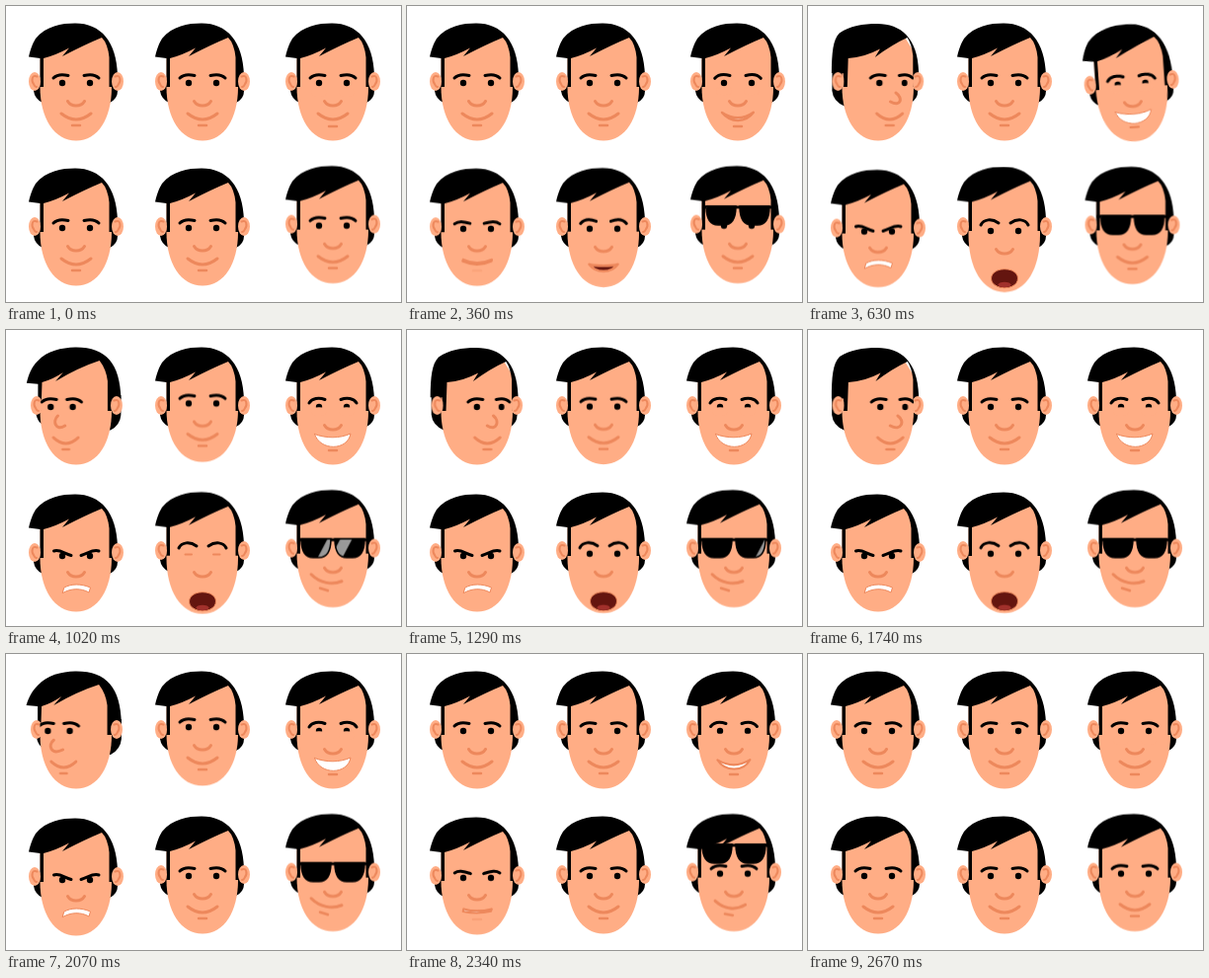
An HTML page without scripts for the animation above (2.7 s loop, 400 by 300 pixels).

```html
<!DOCTYPE html>
<html lang="en">
<head>
<meta charset="utf-8">
<title>Six moods</title>
<style>
html, body { margin: 0; width: 100%; height: 100%; overflow: hidden; background: #fff; }
svg { display: block; width: 100vw; height: 100vh; --skin: #ffad85; --line: #ed885c; }
svg * { animation: 2.7s ease-in-out infinite; }

/* Shared parts, drawn for a head centred on x = 71 */
.back {
  --a: path("M29,74 L28,86 Q29,94 37,98 L105,98 Q113,94 113,86 L113,68 Z");
  --r: path("M24,66 L24,86 Q25,97 37,102 L104,98 Q111,94 111,86 L111,66 Z");
  --l: path("M31,74 L31,84 Q32,92 38,96 L106,102 Q116,97 117,86 L117,66 Z");
}
.hair {
  --a: path("M23,51.5 C25,43 27,38 30,33 C41,20 56,17.5 70,17.5 C96,17.5 112,36 113,70 L107,82 L104.5,82 L104.5,52 Q103,38 97,32 Q80,39 57,51 L64,42.5 Q50,50 38,53 L38,82 L34.5,82 L34.5,53 Z");
  --r: path("M24,70 C24,48 25,34 32,27 C42,20 56,18 70,18 C94,18 111,32 112,66 L109,82 L106.5,82 L106.5,50 Q105,38 101,32 Q86,39 69,52 L74,43.5 Q58,52 41,53 L40,82 L36,82 L36,70 Z");
  --l: path("M20.5,52 C23,44 26,38 32,32 C42,21 56,18 70,17.5 C102,17 116,34 117,70 L108,82 L102.5,82 L102.5,52 Q101,40 94,31 Q72,38 48,52 L56,43 Q46,50 36,53 L35,82 L32,82 L32,53 Z");
}
.nose {
  --a: path("M62.5,96.5 C66,102.5 76,102.5 79.5,96.5");
  --r: path("M92,87 C100,92 96,103 84,97");
  --l: path("M48,87 C41,92 45,103 57,97");
}
.brow-l { --a: path("M48,73 C52,69 57,69 63,70.5"); }
.brow-r { --a: path("M79,70.5 C85,69 90,69 94,73"); }
.mouth { --a: path("M56,109 C66,117 76,117 86,109 C76,117 66,117 56,109 Z"); }
.chin { --a: path("M67,121 L75,121"); }
.back, .hair, .nose, .brow-l, .brow-r, .mouth, .chin { d: var(--a); }
.face { fill: var(--skin); transform-origin: 71px 40px; }
.ear { fill: var(--skin); }
.nose, .mouth, .chin, .fold { fill: none; stroke: var(--line); stroke-width: 3px; stroke-linecap: round; stroke-linejoin: round; }
.chin { stroke-width: 2.5px; }
.fold { stroke-width: 2px; }
.brow-l, .brow-r { fill: none; stroke: #000; stroke-width: 3px; stroke-linecap: round; }

/* Shaking the head */
.no .back, .no .hair, .no .nose { animation-name: turn-shape; }
.no .move { animation-name: turn-move; transform-box: fill-box; transform-origin: center; }
@keyframes turn-shape {
  0%, 15.6%, 85.6%, 100% { d: var(--a); }
  25.6%, 45.6%, 65.6% { d: var(--r); }
  35.6%, 55.6%, 75.6% { d: var(--l); }
}
@keyframes turn-move {
  0%, 15.6%, 85.6%, 100% { transform: none; }
  25.6%, 45.6%, 65.6% { transform: var(--tr); }
  35.6%, 55.6%, 75.6% { transform: var(--tl); }
}

/* Nodding */
.yes .move { animation-name: nod; --up: translateY(-4px); }
.yes .face { animation-name: nod; --up: scaleY(.968); }
@keyframes nod {
  0%, 25.6%, 45.6%, 65.6%, 85.6%, 100% { transform: none; }
  35.6%, 55.6%, 75.6% { transform: var(--up); }
}

/* Laughing and anger */
.emote { animation-name: emote; }
@keyframes emote {
  0%, 10%, 91%, 100% { d: var(--a); stroke-width: 3px; }
  19%, 82% { d: var(--b); stroke-width: var(--w, 3px); }
}
.laugh .mouth, .angry .mouth { fill: #fff; --w: 1px; }
.angry .mouth { --a: path("M56,109 C66,117 76,117 86,109 L86,109 C76,117 66,117 56,109 Z"); }
.cheek { fill: var(--skin); animation-name: cheek; }
@keyframes cheek {
  0%, 10%, 91%, 100% { transform: translateY(5px); }
  19%, 82% { transform: none; }
}
.sway { animation-name: sway; transform-origin: 71px 90px; --tilt: 0deg; }
.laugh { --tilt: -4deg; }
@keyframes sway {
  0%, 6.7%, 37%, 100% { transform: none; }
  14% { transform: translate(4px, 0); }
  22%, 24% { transform: translate(-2.5px, .8px) rotate(var(--tilt)); }
  31% { transform: translate(1px, 0); }
}
.angry { animation-name: sink; }
@keyframes sink {
  0%, 10%, 91%, 100% { transform: none; }
  23% { transform: translateY(1.5px); }
  40%, 82% { transform: translateY(2px); }
}
.angry .chin { animation-name: hide; }
.angry .eyes { animation-name: lower; }
@keyframes hide { 0%, 10%, 91%, 100% { opacity: 1; } 15%, 84% { opacity: 0; } }
@keyframes lower { 0%, 10%, 91%, 100% { transform: none; } 19%, 82% { transform: translateY(2px); } }

/* Surprise */
.gape { animation-name: gape; }
@keyframes gape {
  0%, 10%, 75%, 100% { d: var(--a); stroke-width: 3px; }
  19%, 68% { d: var(--b); stroke-width: var(--w, 3px); }
}
.wow .mouth { fill: #64150f; }
.wow .chin { animation-name: hide-short; }
.tongue { fill: #a1302b; animation-name: tongue; }
.wow .face { animation-name: stretch; --big: scaleY(1.067); --mid: scaleY(1.036); }
.wow .move { animation-name: stretch; --big: translateY(3px); --mid: translateY(1.7px); }
.wow .top { animation-name: stretch; --big: translateY(-1.5px); --mid: translateY(0); }
.wow .eyes { animation-name: blink; animation-timing-function: step-end; }
.lids { opacity: 0; animation-name: lids; animation-timing-function: step-end; }
@keyframes stretch {
  0%, 10%, 76%, 100% { transform: none; }
  20%, 24% { transform: var(--big); }
  44%, 68% { transform: var(--mid); }
}
@keyframes hide-short { 0%, 10%, 76%, 100% { opacity: 1; } 13%, 73% { opacity: 0; } }
@keyframes tongue { 0%, 14%, 72%, 100% { opacity: 0; } 18%, 69% { opacity: 1; } }
@keyframes blink { 0% { opacity: 1; } 35.5% { opacity: 0; } 39.9% { opacity: 1; } }
@keyframes lids { 0% { opacity: 0; } 35.5% { opacity: 1; } 39.9% { opacity: 0; } }

/* Sunglasses */
.smirk { animation-name: smirk; }
@keyframes smirk {
  0%, 26%, 91%, 100% { d: var(--a); }
  35%, 83% { d: var(--b); }
}
.shades { animation-name: shades; }
@keyframes shades {
  0%, 8%, 90%, 100% { transform: translateY(-26px); opacity: 0; }
  11%, 87% { opacity: 1; }
  17%, 81% { transform: none; opacity: 1; }
}
.glint { animation-name: glint; animation-timing-function: linear; }
@keyframes glint {
  0%, 24.3% { transform: translateX(-50px); }
  52.6%, 100% { transform: translateX(55px); }
}
</style>
</head>
<body>
<svg viewBox="0 0 400 300">
  <defs>
    <path id="face" d="M34.5,50 L60,30 H97 L107,46 V82 C107,114 93,136.5 71,136.5 C49,136.5 34.5,114 34.5,82 Z"/>
    <clipPath id="face-clip"><use href="#face"/></clipPath>
    <path id="back" class="back"/>
    <path id="hair" class="hair"/>
    <g id="ear">
      <ellipse class="ear" cx="29" cy="76.5" rx="6" ry="9.5"/>
      <path class="fold" d="M31.500,71.500 C26,69 25.500,76 28,79 Q29,82 31,82"/>
    </g>
    <g id="ears">
      <use href="#ear"/>
      <use href="#ear" transform="matrix(-1 0 0 1 142 0)"/>
    </g>
    <circle id="eye" cx="57" cy="78" r="3.2"/>
    <g id="eyes"><use href="#eye"/><use href="#eye" x="28"/></g>
    <path id="nose" class="nose"/>
    <g id="brows"><path class="brow-l"/><path class="brow-r"/></g>
    <path id="lens" d="M39,67 H69 C69,76 67,86 57,86 H51 C42,86 39,77 39,67 Z"/>
    <g id="lenses"><use href="#lens"/><use href="#lens" transform="matrix(-1 0 0 1 142 0)"/></g>
    <clipPath id="lens-clip">
      <use href="#lens"/><use href="#lens" transform="matrix(-1 0 0 1 142 0)"/>
    </clipPath>
  </defs>

  <g class="no">
    <path class="back"/>
    <use href="#face" class="face"/>
    <path class="hair"/>
    <g class="move" style="--tr:translateX(1.5px);--tl:translateX(2px)"><use href="#ear"/></g>
    <g class="move" style="--tr:translateX(-2px);--tl:translateX(-1px)"><use href="#ear" transform="matrix(-1 0 0 1 142 0)"/></g>
    <g clip-path="url(#face-clip)">
      <g class="move" style="--tr:translateX(17px);--tl:translateX(-15px)">
        <path class="brow-l"/><use href="#eye"/>
      </g>
      <g class="move" style="--tr:translateX(14px) scaleX(.9);--tl:translateX(-21px)">
        <path class="brow-r"/><use href="#eye" x="28"/>
      </g>
    </g>
    <path class="nose"/>
    <path class="mouth move" style="--tr:translateX(13px) scaleX(.86);--tl:translateX(-13px) scaleX(.84)"/>
    <path class="chin move" style="--tr:translateX(13px);--tl:translateX(-13px) scaleX(.85)"/>
  </g>

  <g transform="translate(128 0)">
    <g class="yes">
      <use href="#back"/>
      <use href="#face" class="face"/>
      <use href="#hair"/>
      <use href="#ears"/>
      <g class="move">
        <use href="#brows"/><use href="#eyes"/><use href="#nose"/>
        <path class="mouth"/><path class="chin"/>
      </g>
    </g>
  </g>

  <g transform="translate(260 0)">
    <g class="laugh sway">
      <use href="#back"/>
      <use href="#face" class="face"/>
      <use href="#hair"/>
      <use href="#ears"/>
      <use href="#eyes"/>
      <g class="cheek"><ellipse cx="57" cy="82.5" rx="8" ry="4.2"/><ellipse cx="85" cy="82.5" rx="8" ry="4.2"/></g>
      <path class="brow-l emote" style="--b:path('M47,74 C50,69 57,68 63,70.5')"/>
      <path class="brow-r emote" style="--b:path('M79,70.5 C85,68 92,69 95,74')"/>
      <use href="#nose"/>
      <path class="mouth emote" style="--b:path('M52.5,105.500 C64,110 78,110 89,105 C86,122.500 58,123 52.5,105.500 Z')"/>
      <path class="chin" transform="translate(0 1)"/>
    </g>
  </g>

  <g transform="translate(0 147)">
    <g class="angry">
      <use href="#back"/>
      <use href="#face" class="face"/>
      <use href="#hair"/>
      <use href="#ears"/>
      <g class="eyes"><use href="#eyes"/></g>
      <path class="brow-l emote" style="--b:path('M48.5,75 C54,73 58,77 66,79.5')"/>
      <path class="brow-r emote" style="--b:path('M76,79.5 C84,77 88,73 94,75')"/>
      <use href="#nose"/>
      <path class="mouth emote" style="--b:path('M57.5,117.5 C66,112.500 76,112.500 84,117 L85.5,112 C76,108 66,108 59,112 Z')"/>
      <path class="chin"/>
    </g>
  </g>

  <g transform="translate(128 147)">
    <g class="wow">
      <use href="#back"/>
      <use href="#face" class="face"/>
      <g class="top"><use href="#hair"/></g>
      <use href="#ears"/>
      <g class="move">
        <path class="brow-l gape" style="--b:path('M47,72 C50,66 58,65 65,70')"/>
        <path class="brow-r gape" style="--b:path('M77,70 C84,65 92,66 95,72')"/>
        <g class="eyes"><use href="#eyes"/></g>
        <path class="fold lids" d="M53.5,78.5 H60 M82,78.5 H88.5"/>
        <use href="#nose"/>
        <path class="mouth gape" style="--w:1px;--b:path('M57.5,126 C57.5,139 84.5,139 84.5,126 C84.5,113.5 57.5,113.5 57.5,126 Z')"/>
        <ellipse class="tongue" cx="71" cy="132.5" rx="6.5" ry="2.8"/>
        <path class="chin"/>
      </g>
    </g>
  </g>

  <g transform="translate(260 144.6)">
    <g class="sway">
      <use href="#back"/>
      <use href="#face" class="face"/>
      <use href="#hair"/>
      <use href="#ears"/>
      <use href="#brows"/><use href="#eyes"/><use href="#nose"/>
      <path class="mouth smirk" style="--b:path('M49,103 C58,112 70,114 80,110 C70,114 58,112 49,103 Z')"/>
      <path class="chin smirk" style="--b:path('M58,117 L66,119.5')"/>
      <g class="shades">
        <path d="M35,66.5 H108 V69.5 H35 Z"/>
        <use href="#lenses"/>
        <g clip-path="url(#lens-clip)">
          <path class="glint" fill="#999" d="M66,66 H74 L63,87 H55 Z M79,66 H91 L80,87 H68 Z"/>
        </g>
        <use href="#lenses" fill="none" stroke="#000" stroke-width="1.5"/>
      </g>
    </g>
  </g>
</svg>
</body>
</html>
```
